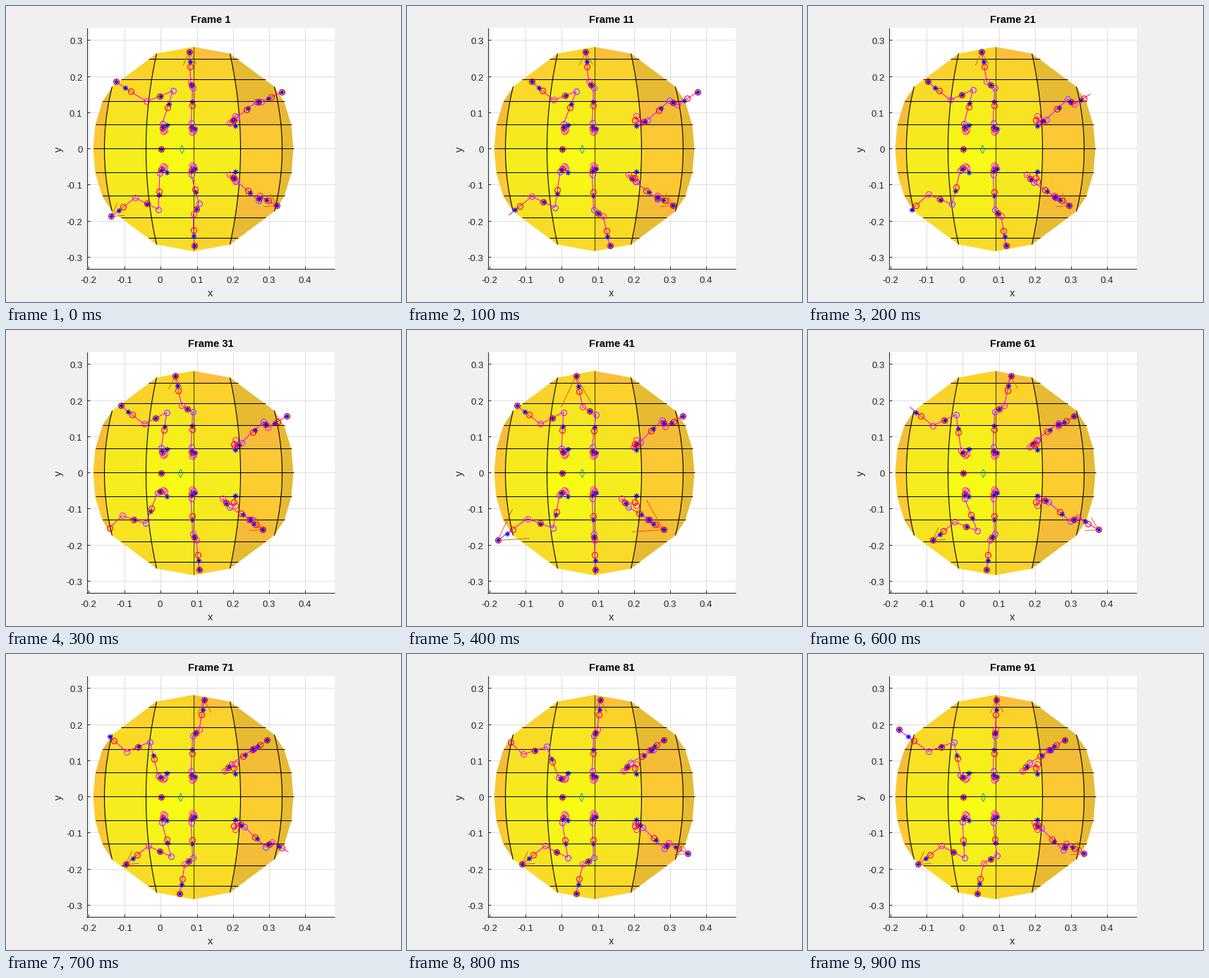
These frames come from a looping animation (560x420 px, 1 s). A matplotlib script:

```python
import numpy as np
import matplotlib.pyplot as plt
from matplotlib.animation import FuncAnimation
from matplotlib.collections import LineCollection
from matplotlib.patches import Polygon, Rectangle

W, H, DPI = 560, 420, 100
FRAMES = 10
PX = 72 / DPI  # points per pixel
INK = "#262626"
MID_X, MID_Y = 266, 202.5

plt.rcParams["font.family"] = "Liberation Sans"
plt.rcParams["axes.unicode_minus"] = False
fig = plt.figure(figsize=(W / DPI, H / DPI), dpi=DPI, facecolor="#f0f0f0")
ax = fig.add_axes([0, 0, 1, 1])
ax.axis("off")


def to_px(x, y):
    return 219.4 + 512.3 * x, MID_Y - 512.5 * y


def line(xs, ys, color=INK, width=1.0, z=1):
    ax.plot(xs, ys, color=color, lw=width * PX, zorder=z, solid_capstyle="butt")


def label(x, y, text, size, **kw):
    return ax.text(x, y, text, fontsize=size * PX, **kw)


def draw_axes():
    left, right, top, bottom = 115, 466, 31, 373
    ax.add_patch(Rectangle((left, top), right - left, bottom - top, fc="white", ec="none", zorder=0))
    for i in range(-2, 5):
        x = round(to_px(i / 10, 0)[0])
        line([x, x], [top, bottom], "#dedede")
        line([x, x], [bottom, bottom - 4], z=2)
        label(x, 393, f"{i / 10:g}", 13.3, color=INK, ha="center", va="baseline")
    for i in range(-3, 4):
        y = np.floor(to_px(0, i / 10)[1])
        line([left, right], [y, y], "#dedede")
        line([left, left + 4], [y, y], z=2)
        label(109, y + 6, f"{i / 10:g}", 13.3, color=INK, ha="right", va="baseline")
    line([left, left], [top, bottom + 0.5], z=2)
    line([left - 0.5, right], [bottom, bottom], z=2)
    label(290, 412, "x", 14.7, color=INK, ha="center", va="baseline")
    label(75, MID_Y, "y", 14.7, color=INK, ha="center", va="center", rotation=90)


def inner_ring(dy):
    return 67 - 15 * (dy / 135.5) ** 2


def outer_ring(dy):
    return 126 - 11 * (dy / 88.5) ** 2


def facet_colors():
    """Flat colour per facet, taken from the facet's upper right corner."""
    yy, xx = np.mgrid[0:H, 0:W]
    dx, dy = xx - MID_X, yy - MID_Y
    inner, outer = inner_ring(dy), outer_ring(dy)
    column = sum((dx > edge).astype(int) for edge in (-outer, -inner, 0, inner, outer))
    corner_x = np.array([-0.89, -0.47, 0, 0.47, 0.89, 1])[column]
    rows = np.array([-145, -127, -98, -67, -34, 0, 34, 67, 98, 127])
    corner_y = rows[np.clip(np.searchsorted(rows, dy) - 1, 0, None)] / 145
    depth = np.hypot(corner_x, 0.82 * corner_y)
    stops = [0, 0.47, 0.88, 0.95, 1]
    tones = np.array([(249, 251, 20), (246, 237, 30), (252, 208, 45),
                      (254, 190, 60), (230, 187, 50)]) / 255
    return np.dstack([np.interp(depth, stops, tone) for tone in tones.T])


def draw_body():
    quarter = np.array([(142, 0), (139, 34), (129, 67), (115, 88.5), (52, 135.5), (0, 145)])
    outline = np.vstack([quarter, quarter[::-1] * (-1, 1), quarter * (-1, -1), quarter[::-1] * (1, -1)])
    shape = Polygon(outline + (MID_X, MID_Y), fc="none", ec="none")
    ax.add_patch(shape)
    image = ax.imshow(facet_colors(), extent=(-0.5, W - 0.5, H - 0.5, -0.5), aspect="auto",
                      interpolation="nearest", zorder=3)
    image.set_clip_path(shape)

    for dy in (0, 34, 67, 98, 127):
        half = np.interp(dy, quarter[:, 1], quarter[:, 0])
        for y in {MID_Y - dy, MID_Y + dy}:
            line([MID_X - half, MID_X + half], [np.floor(y)] * 2, "black", z=4)
    line([MID_X, MID_X], [58, 347], "black", 0.7, 4)
    for ring, reach in ((inner_ring, 135.5), (outer_ring, 88.5)):
        dy = np.linspace(-reach, reach, 21)
        for side in (-1, 1):
            line(MID_X + side * ring(dy), MID_Y + dy, "black", 1.1, 4)


def gait(q):
    """Foot travel and lift: a quick swing forward, then a steady push back."""
    keys = [0, 1, 8, 9, 10]
    return np.interp(q, keys, [0, 21, -27, -27, 0]), np.interp(q, keys, [1, 0, 0, 0.6, 1])


def joints(kind, q):
    """Joints from body to foot for an upper leg at gait phase q."""
    travel, lift = gait(q)
    s = travel / 27
    front, back = max(s, 0), max(-s, 0)
    sag = back ** 2 * (1 - lift)
    if kind == "left":
        knee = (222 + 23.5 * s + 15 * lift, 116 + 15 * sag + 8 * front ** 2 + 4 * lift)
        ankle = (189.5 + 24.5 * s + 10 * lift, 133 + 9 * sag + 2 * lift)
        hip = (215 + 0.18 * (knee[0] - 197), 166 + 9 * ((239 - knee[0]) / 42) ** 2)
        chain = [(228, 169), (225.5, 176), (223, 178), hip, knee, ankle, (156 + travel, 107)]
    elif kind == "mid":
        knee = (265 + 9 * lift ** 2, 116 + 9 * lift ** 2)
        ankle = (266 + 0.6 * travel, 107 + 3 * lift)
        chain = [(268, 174), (266, 177), (264, 179), (263, 166), knee, ankle, (267 + travel, 65)]
    else:
        hip = (331 + 14 * s - 4 * lift, 158 + 4 * s)
        knee = (362 + 13 * s - 7 * lift, 127 + 9 * max(abs(s), lift))
        ankle = (366 + 22 * s - 4 * lift, 136 + 5 * front)
        chain = [(325, 170), (325, 156), (hip[0] - 10, 166), hip, knee, ankle, (391 + travel, 122)]
    return np.array(chain, float)


def visible_shin(kind, q):
    """Share of the last link that stays inside the plotted depth."""
    if kind == "left":
        return np.interp(q, [5, 6, 8, 9], [1, 0.94, 0.5, 1])
    if kind == "right":
        return np.interp(q, [1, 2, 3], [1, 0.85, 1])
    return 1


def along(a, b, f):
    return a + (b - a) * f


def build_leg(kind, upper, q):
    pts = joints(kind, q)
    if not upper:
        pts[:, 1] = 2 * MID_Y - pts[:, 1]
    base, first, second, hip, knee, ankle, foot = pts
    shown = visible_shin(kind, q)
    star_at = 0.36 if kind == "right" else 0.68
    reds = [along(second, hip, 0.5), along(hip, knee, 0.5),
            along(knee, ankle, 0.5), along(ankle, foot, 0.5)]
    stars = [base, along(second, hip, 0.55), along(hip, knee, 0.6), along(knee, ankle, 0.48)]
    if kind == "right":
        reds.append(along(base, first, 0.6) - (2, 0))
    if shown > star_at:
        stars.append(along(ankle, foot, star_at))
    if shown == 1:
        reds.append(foot)
        stars.append(foot)
    path = np.vstack([pts[:6], along(ankle, foot, shown)])
    return path, pts[1:6], reds, stars, foot, shown == 1


def support_lines(feet, shown, step):
    """Parts of the support triangle not hidden by the body."""
    reach = np.interp(step, [3, 4, 5, 6], [0.08, 0.19, 1, 0.08])
    top, left, right = feet
    if reach == 1:
        return [(top, along(top, left, 0.4)), (along(top, left, 0.63), left),
                (left, right), (right, top)]
    return [(a, along(a, b, reach)) for i, a in enumerate(feet) if shown[i]
            for j, b in enumerate(feet) if i != j]


def markers(marker, color, size, z, width=1.0):
    return ax.plot([], [], ls="none", marker=marker, mfc="none", mec=color,
                   ms=size * PX, mew=width * PX, zorder=z)[0]


draw_axes()
draw_body()
ax.set_xlim(0.5, W + 0.5)
ax.set_ylim(H - 0.5, -0.5)
title = label(290.5, 24, "", 14.7, color="black", weight="bold", ha="center", va="baseline")
triangle = ax.add_collection(LineCollection([], colors="#d95319", linewidths=0.9 * PX, zorder=5))
limbs = ax.add_collection(LineCollection([], colors="magenta", linewidths=1.1 * PX, zorder=6))
cyan_rings = markers("o", "cyan", 7.5, 5.5)
joint_rings = markers("o", "magenta", 8, 7)
mass_stars = markers((8, 2, 0), "blue", 7.5, 8, 0.8)
mass_rings = markers("o", "red", 8, 9, 1.1)
center = markers("d", "#00a08c", 8, 7, 0.9)


def update(step):
    paths, rings, hinges, feet, shown = [], [], [], [], []
    root = np.array([220, MID_Y])
    reds, stars = [root], [root]
    for upper in (True, False):
        for kind in ("mid", "left", "right"):
            tripod = upper == (kind == "mid")
            q = (step + 5 * tripod) % FRAMES
            path, ring, red, star, foot, visible = build_leg(kind, upper, q)
            paths.append(path)
            rings.extend(ring)
            hinges.extend(ring[2:4])
            reds += red
            stars += star
            if tripod:
                feet.append(foot)
                shown.append(visible)
    limbs.set_segments(paths)
    triangle.set_segments(support_lines(feet, shown, step))
    joint_rings.set_data(*np.array(rings).T)
    cyan_rings.set_data(*(np.array(hinges) + (0.3, 0.8)).T)
    mass_rings.set_data(*np.array(reds).T)
    mass_stars.set_data(*np.array(stars).T)
    center.set_data([248.3 + np.cos(2 * np.pi * step / 5)], [MID_Y])
    title.set_text(f"Frame {10 * step + 1}")
    return limbs, triangle, joint_rings, cyan_rings, mass_rings, mass_stars, center, title


anim = FuncAnimation(fig, update, frames=FRAMES, interval=100, repeat=True, repeat_delay=0)
plt.show()
```
